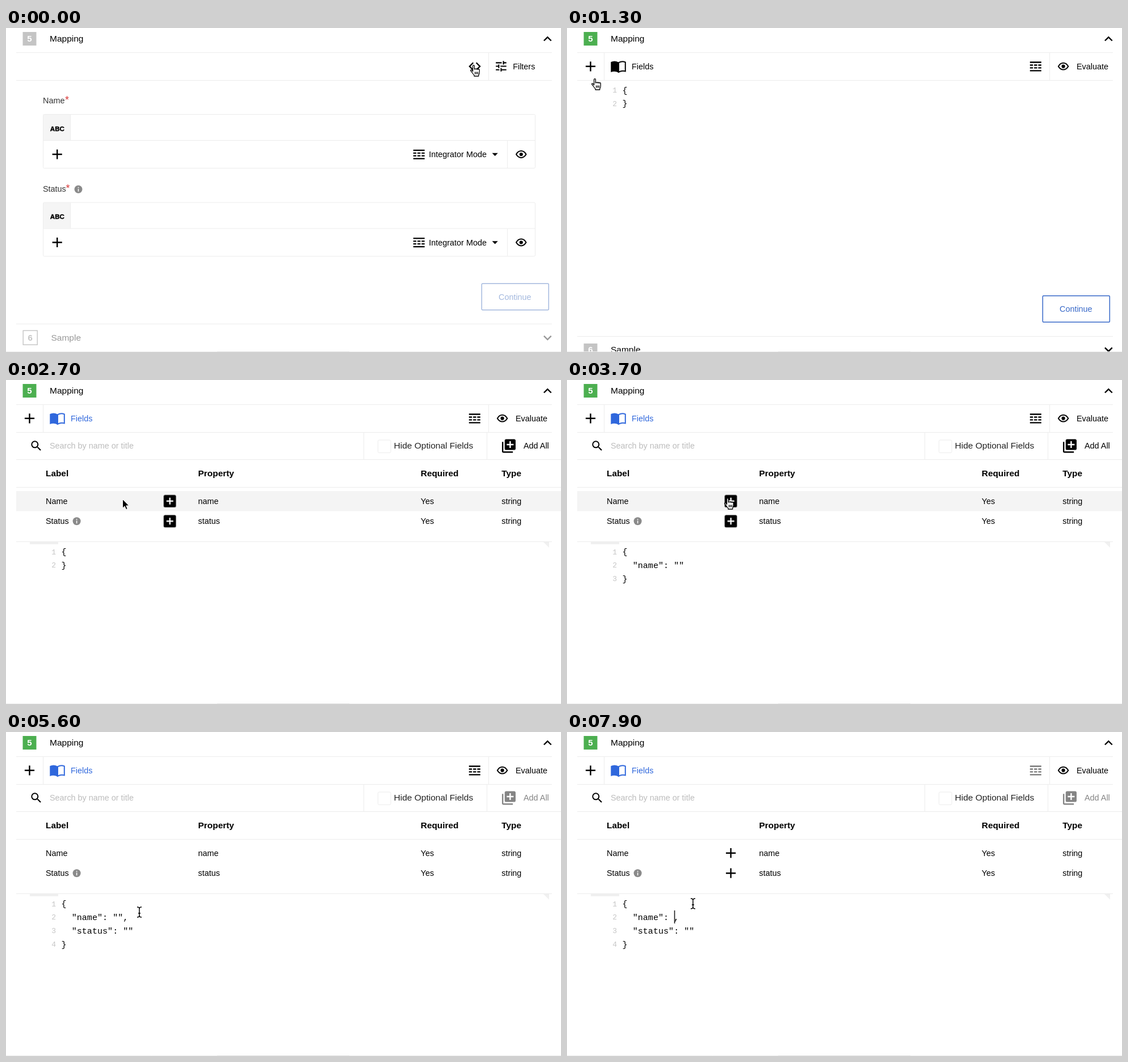
Write an HTML page that moves like this. It is 978 by 572 pixels and loops after 8 s.

```html
<!DOCTYPE html>
<html lang="en">
<head>
<meta charset="utf-8">
<title>Field mapping</title>
<style>
html, body { margin: 0; width: 100%; height: 100%; overflow: hidden; background: #fff; }
svg { display: block; }
text { font: 14.4px "Liberation Sans", Arial, sans-serif; fill: currentColor; white-space: pre; }
.big { font-size: 15.5px; }
.head { font-size: 15.4px; font-weight: 700; }
.step { font-size: 15px; font-weight: 700; fill: #fff; text-anchor: middle; }
.code text { font: 15.1px "Liberation Mono", "Courier New", monospace; }
.code .num { font-size: 13px; fill: #c6c6c6; text-anchor: end; }
.abc { font-size: 11.6px; font-weight: 700; stroke: #000; stroke-width: .4; }
.rule { stroke: #ececec; fill: none; }
.pen { stroke: currentColor; fill: none; }
.ico { fill: currentColor; }

/* 8 s loop, 1.25% = 100 ms, hard changes only */
.t { animation: 8s step-end infinite; }
.form { animation-name: form; }
.body { animation-name: body; }
.plain { animation-name: plain; }
.panel { animation-name: panel; }
.empty { animation-name: empty; }
.one { animation-name: one; }
.both { animation-name: both; }
.quotes2 { animation-name: quotes2; }
.quotes1 { animation-name: quotes1; }
.quotes0 { animation-name: quotes0; }
.addName { animation-name: addName; }
.addStatus { animation-name: addStatus; }
.again { animation-name: again; }
.fields { animation-name: fields; }
.addAll { animation-name: addAll; }
.mode { animation-name: mode; }
.row { animation-name: row; }
.caret { animation-name: caret; }
.cursor { animation-name: cursor; }
.hand { animation-name: hand; }
.arrow { animation-name: arrow; }
.beam { animation-name: beam; }

@keyframes form { 0% { opacity: 1 } 2.5%, to { opacity: 0 } }
@keyframes body { 0% { opacity: 0 } 2.5%, to { opacity: 1 } }
@keyframes plain { 0% { opacity: 1 } 23.75%, to { opacity: 0 } }
@keyframes panel { 0% { opacity: 0 } 23.75%, to { opacity: 1 } }
@keyframes empty { 0% { opacity: 1 } 46.25%, to { opacity: 0 } }
@keyframes one { 0% { opacity: 0 } 46.25% { opacity: 1 } 62.5%, to { opacity: 0 } }
@keyframes both { 0% { opacity: 0 } 62.5%, to { opacity: 1 } }
@keyframes quotes2 { 0% { opacity: 1 } 93.75%, to { opacity: 0 } }
@keyframes quotes1 { 0% { opacity: 0 } 93.75% { opacity: 1 } 95%, to { opacity: 0 } }
@keyframes quotes0 { 0% { opacity: 0 } 95%, to { opacity: 1 } }
@keyframes addName { 0% { opacity: 1 } 47.5%, to { opacity: 0 } }
@keyframes addStatus { 0% { opacity: 1 } 66.25%, to { opacity: 0 } }
@keyframes again { 0% { opacity: 0 } 98.75%, to { opacity: 1 } }
@keyframes fields { 0% { color: #000 } 23.75%, to { color: #2f67dc } }
@keyframes addAll { 0% { color: #000 } 66.25%, to { color: #858585 } }
@keyframes mode { 0% { color: #000 } 98.75%, to { color: #777 } }
@keyframes row {
  0% { opacity: 0; transform: none }
  33.75% { opacity: 1; transform: none }
  35% { opacity: 1; transform: translateY(35.5px) }
  38.75% { opacity: 1; transform: none }
  48.75% { opacity: 1; transform: translateY(35.5px) }
  68.75%, to { opacity: 0; transform: none }
}
@keyframes caret {
  0% { opacity: 0; transform: translateX(206.8px) }
  73.75% { opacity: 1; transform: translateX(206.8px) }
  80% { opacity: 0; transform: translateX(206.8px) }
  86.25% { opacity: 1; transform: translateX(206.8px) }
  92.5% { opacity: 0; transform: translateX(206.8px) }
  93.75% { opacity: 1; transform: translateX(197.8px) }
  95%, to { opacity: 1; transform: translateX(188.8px) }
}
@keyframes cursor {
  0% { transform: translate(818px, 65px) }
  8.75% { transform: translate(790px, 66px) }
  10% { transform: translate(690px, 70px) }
  11.25% { transform: translate(540px, 76px) }
  12.5% { transform: translate(380px, 82px) }
  13.75% { transform: translate(230px, 88px) }
  15% { transform: translate(110px, 91px) }
  16.25% { transform: translate(43px, 89px) }
  17.5% { transform: translate(50px, 82px) }
  18.75% { transform: translate(68px, 72px) }
  20% { transform: translate(72px, 70px) }
  21.25% { transform: translate(75px, 68px) }
  30% { transform: translate(90px, 84px) }
  31.25% { transform: translate(130px, 130px) }
  32.5% { transform: translate(172px, 178px) }
  33.75% { transform: translate(205px, 210px) }
  35% { transform: translate(245px, 250px) }
  36.25% { transform: translate(264px, 263px) }
  37.5% { transform: translate(272px, 250px) }
  38.75% { transform: translate(273px, 228px) }
  40% { transform: translate(273px, 213px) }
  41.25% { transform: translate(275px, 210px) }
  42.5% { transform: translate(277px, 208px) }
  47.5% { transform: translate(277px, 211px) }
  48.75% { transform: translate(280px, 236px) }
  50% { transform: translate(282px, 243px) }
  51.25% { transform: translate(283px, 247px) }
  53.75% { transform: translate(282px, 245px) }
  68.75% { transform: translate(266px, 280px) }
  70% { transform: translate(230px, 308px) }
  71.25% { transform: translate(218px, 311px) }
  72.5% { transform: translate(209px, 310px) }
  73.75% { transform: translate(205px, 310px) }
  75% { transform: translate(203px, 310px) }
  98.75%, to { transform: translate(217px, 293px) }
}
@keyframes hand {
  0% { opacity: 1 } 10% { opacity: 0 } 16.25% { opacity: 1 } 31.25% { opacity: 0 }
  37.5% { opacity: 1 } 68.75%, to { opacity: 0 }
}
@keyframes arrow {
  0% { opacity: 0 } 10% { opacity: 1 } 16.25% { opacity: 0 } 31.25% { opacity: 1 }
  37.5% { opacity: 0 } 68.75% { opacity: 1 } 70%, to { opacity: 0 }
}
@keyframes beam {
  0% { opacity: 0 } 70% { opacity: 1 } 93.75% { opacity: 0 } 98.75%, to { opacity: 1 }
}
</style>
</head>
<body>
<svg width="978" height="572" viewBox="0 0 978 572" color="#000">
  <defs>
    <path id="plus" class="pen" stroke-width="2.4" d="M-8.6 0H8.6M0-8.6V8.6"/>
    <g id="modeIcon" class="pen" stroke-width="2.3">
      <path d="M-10-7.2H10M-10 7.6H10"/>
      <path d="M-10-2.2H10" stroke-dasharray="5.4 1.9"/>
      <path d="M-10 2.7H10" stroke-dasharray="5.4 1.9"/>
    </g>
    <g id="eye">
      <path class="pen" stroke-width="2" d="M-8.7 0Q-5.3-5.9 0-5.9T8.7 0Q5.3 5.9 0 5.9T-8.7 0z"/>
      <circle class="ico" r="3.1"/>
    </g>
    <path id="chevron" class="pen" stroke-width="2.4" d="M-6.4 3.7L0-2.7 6.4 3.7"/>
    <g id="info">
      <circle r="7" fill="#8a8a8a"/>
      <path d="M0-4v1.8M0-.9V4" stroke="#fff" stroke-width="1.5"/>
    </g>
    <g id="addBox">
      <rect x="-10.9" y="-10.8" width="21.7" height="21.7" rx="2.5"/>
      <path d="M-6 0H6M0-6V6" stroke="#fff" stroke-width="2.4"/>
    </g>
    <g id="field">
      <path fill="#f5f5f5" d="M66 153h48v45H66z"/>
      <rect class="rule" x="65.5" y="152.5" width="867" height="95" rx="2"/>
      <path class="rule" d="M66 198.5H932M113.5 153V198M883.5 199V247"/>
      <text class="abc" x="77.8" y="181.5">ABC</text>
      <use href="#plus" x="90.2" y="223"/>
      <use href="#modeIcon" x="727.7" y="223"/>
      <text x="745.3" y="228">Integrator Mode</text>
      <path class="ico" d="M856.6 220.8h10.2l-5.1 5.3z"/>
      <use href="#eye" x="907.8" y="223"/>
    </g>
  </defs>

  <!-- section header -->
  <path class="rule" d="M18 43.5H962M18 92.5H962"/>
  <text class="big" x="77" y="24">Mapping</text>
  <use href="#chevron" x="954.3" y="18.8"/>

  <!-- form view -->
  <g class="t form">
    <path fill="#c4c4c4" d="M29.5 7h24v24h-24z"/>
    <path class="rule" d="M850.5 44V92M18 522.5H962"/>
    <path class="pen" stroke-width="2.3" d="M823.3 61.3l-6.4 6.4 6.4 6.4M828.7 61.3l6.4 6.4-6.4 6.4"/>
    <path class="ico" transform="translate(860.1 55.2) scale(1.03)" d="M3 17v2h6v-2H3zM3 5v2h10V5H3zm10 16v-2h8v-2h-8v-2h-2v6h2zM7 9v2H3v2h4v2h2V9H7zm14 4v-2H11v2h10zm-6-4h2V7h4V5h-4V3h-2v6z"/>
    <text x="893.2" y="72.6">Filters</text>
    <g color="#333">
      <text x="65" y="133">Name</text>
      <text x="65" y="288.6">Status</text>
    </g>
    <g color="#d93a3a">
      <text x="104" y="133" font-size="18" style="font-size:18px">*</text>
      <text x="105.6" y="288.6" style="font-size:18px">*</text>
    </g>
    <use href="#info" x="127.5" y="284.8"/>
    <use href="#field"/>
    <use href="#field" y="155.5"/>
    <g color="#a3b8de">
      <rect class="pen" stroke-width="1.5" x="838.3" y="451.3" width="118" height="46.5" rx="1.5"/>
      <text x="868" y="479.6">Continue</text>
    </g>
    <rect x="30.2" y="534.2" width="25" height="25" fill="none" stroke="#c4c4c4" stroke-width="1.4"/>
    <text class="step" x="42.6" y="552" style="fill:#c4c4c4">6</text>
    <g color="#999">
      <text class="big" x="79.5" y="552">Sample</text>
      <use href="#chevron" transform="translate(954.3 547.4) scale(1 -1)"/>
    </g>
  </g>

  <!-- code view -->
  <g class="t body">
    <path fill="#4caf50" d="M29.5 7h24v24h-24z"/>
    <path class="rule" d="M65.5 44V92M850.5 44V92"/>
    <use href="#plus" x="41.5" y="67.8"/>
    <g class="t fields">
      <path class="ico" d="M77.3 60Q84 56.8 90.8 60.4V78.7Q84 75.2 77.3 78z"/>
      <path class="pen" stroke-width="2" d="M91 61.2Q97 57.6 102.8 60.3V76.4Q97 74.6 91 77.8z"/>
      <text x="114" y="72.6">Fields</text>
    </g>
    <g class="t mode"><use href="#modeIcon" x="825.8" y="67.7"/></g>
    <use href="#eye" x="874.6" y="67.7"/>
    <text x="898" y="72.6">Evaluate</text>

    <g class="t plain">
      <g class="code">
        <text class="num" x="88" y="114">1</text><text x="97.6" y="114.6">{</text>
        <text class="num" x="88" y="137.8">2</text><text x="97.6" y="138.4">}</text>
      </g>
      <g color="#3768c8">
        <rect class="pen" stroke-width="1.5" x="838.3" y="472.8" width="118" height="46.5" rx="1.5"/>
        <text x="868" y="501">Continue</text>
      </g>
      <path class="rule" d="M18 544.5H962"/>
      <path fill="#c4c4c4" d="M29.5 557h24v15h-24z"/>
      <text class="step" x="41.5" y="573.3">6</text>
      <text class="big" x="77" y="573.4">Sample</text>
      <use href="#chevron" transform="translate(954.3 568) scale(1 -1)"/>
    </g>

    <g class="t panel">
      <rect class="t row" x="18" y="196" width="960" height="35.5" fill="#f4f4f4"/>
      <path class="rule" d="M18 140.5H978M18 189.5H978M18 285.5H962M630.5 93V140M847.5 93V140"/>
      <path fill="#f0f0f0" d="M42 286h50v4H42zM947 286h10v10z"/>
      <path class="ico" transform="translate(41.3 104.3)" d="M15.5 14h-.79l-.28-.27A6.47 6.47 0 0 0 16 9.5 6.5 6.5 0 1 0 9.5 16c1.61 0 3.09-.59 4.23-1.57l.27.28v.79l5 4.99L20.49 19l-4.99-5zm-6 0a4.5 4.5 0 1 1 0-9 4.5 4.5 0 0 1 0 9z"/>
      <text x="77" y="121.2" color="#bcbcbc">Search by name or title</text>
      <rect class="rule" x="655.5" y="106" width="22.5" height="22.5" rx="2"/>
      <text class="big" x="683.6" y="121.4" color="#222">Hide Optional Fields</text>
      <g class="t addAll">
        <path class="ico" transform="translate(871.6 102) scale(1.2)" d="M4 6H2v14c0 1.1.9 2 2 2h14v-2H4V6zm16-4H8c-1.1 0-2 .9-2 2v12c0 1.1.9 2 2 2h12c1.1 0 2-.9 2-2V4c0-1.1-.9-2-2-2zm-1 9h-4v4h-2v-4H9V9h4V5h2v4h4v2z"/>
        <text x="912" y="121.2">Add All</text>
      </g>
      <text class="head" x="70" y="169.8">Label</text>
      <text class="head" x="338.6" y="169.8">Property</text>
      <text class="head" x="730.8" y="169.8">Required</text>
      <text class="head" x="873.2" y="169.8">Type</text>

      <text x="70" y="218.6">Name</text>
      <text x="338.6" y="218.6">name</text>
      <text x="730.8" y="218.6">Yes</text>
      <text x="873.2" y="218.6">string</text>
      <text x="70" y="254.1">Status</text>
      <text x="338.6" y="254.1">status</text>
      <text x="730.8" y="254.1">Yes</text>
      <text x="873.2" y="254.1">string</text>
      <use href="#info" x="124.6" y="249.2"/>
      <use class="t addName" href="#addBox" x="288.7" y="213.7"/>
      <use class="t addStatus" href="#addBox" x="288.7" y="249.2"/>
      <g class="t again">
        <use href="#plus" x="288.7" y="213.7"/>
        <use href="#plus" x="288.7" y="249.2"/>
      </g>

      <g class="code">
        <text class="num" x="88" y="307.6">1</text><text x="97.6" y="308.2">{</text>
        <text class="num" x="88" y="331.4">2</text>
        <g class="t empty"><text x="97.6" y="332">}</text></g>
        <g class="t one">
          <text x="115.7" y="332">"name": ""</text>
          <text class="num" x="88" y="355.2">3</text><text x="97.6" y="355.8">}</text>
        </g>
        <g class="t both">
          <text class="t quotes2" x="115.7" y="332">"name": "",</text>
          <text class="t quotes1" x="115.7" y="332">"name": ",</text>
          <text class="t quotes0" x="115.7" y="332">"name": ,</text>
          <text class="num" x="88" y="355.2">3</text><text x="115.7" y="355.8">"status": ""</text>
          <text class="num" x="88" y="379">4</text><text x="97.6" y="379.6">}</text>
        </g>
      </g>
      <rect class="t caret" y="315" width="1.4" height="23"/>
    </g>
  </g>

  <path stroke="#ececec" d="M0 571.5H978"/>
  <path stroke="#e0e0e0" d="M372 571.5H605"/>

  <!-- pointer -->
  <g class="t cursor">
    <g class="t hand" stroke="#000" stroke-width="1.3" stroke-linejoin="round">
      <path fill="#fff" d="M4.6 11.6V2.3Q4.6.7 6 .7T7.4 2.3V8q.3-1.2 1.5-1.2T10.3 8q.4-1 1.5-1t1.4 1.4q.4-.9 1.5-.9 1.6 0 1.6 2v3.6q0 2.4-1.5 5.2V20H7v-1.6Q5.4 16.6 3.6 14 2 11.6.9 10.5.4 9.2 1.6 8.9 3 8.8 4.6 11.6z"/>
      <path d="M8.6 12.6v4M11 12.6v4M13.4 12.6v4"/>
    </g>
    <path class="t arrow" stroke="#fff" d="M.5.5V16.2l3.6-3.4 2.5 5.8 2.6-1.1-2.4-5.6h4.9z"/>
    <g class="t beam" fill="none">
      <path id="beamLine" stroke="#fff" stroke-width="3" d="M1 1q4 0 4 3v12q0 3-4 3M9 1Q5 1 5 4M5 16q0 3 4 3M3 12h4"/>
      <path stroke="#000" stroke-width="1.5" d="M1 1q4 0 4 3v12q0 3-4 3M9 1Q5 1 5 4M5 16q0 3 4 3M3 12h4"/>
    </g>
  </g>

  <text class="step" x="41.5" y="24.3">5</text>
</svg>
</body>
</html>
```
